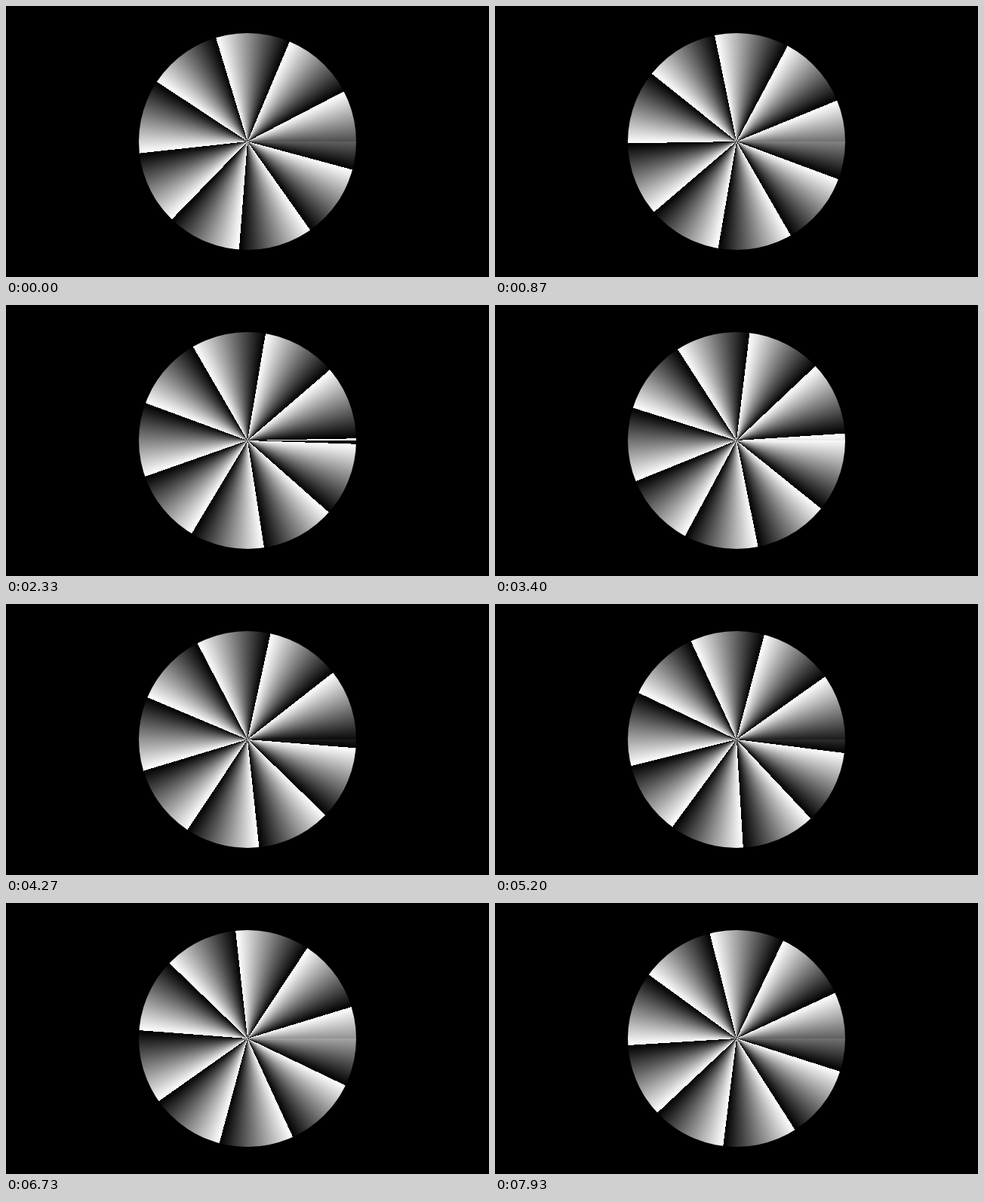
An HTML page that plays this animation: 640 by 360 pixels, repeating every 8000 ms.

```html
<!DOCTYPE html>
<html lang="en">
<head>
<meta charset="utf-8">
<title>Fan wheel</title>
<style>
  @property --start {
    syntax: "<angle>";
    inherits: false;
    initial-value: 15.1deg;
  }

  html, body {
    margin: 0;
    width: 100%;
    height: 100%;
    overflow: hidden;
    background: #000;
  }

  /* The blade width does not divide 360deg, which leaves a fixed seam at three o'clock. */
  .wheel {
    position: absolute;
    left: 176px;
    top: 36px;
    width: 288px;
    height: 288px;
    border-radius: 50%;
    background: repeating-conic-gradient(
      from 90deg,
      #fff var(--start),
      #000 calc(var(--start) + 39.67deg)
    );
    animation: turn 1s steps(15) -3.4ms infinite;
  }

  /* One blade per second, counterclockwise. */
  @keyframes turn {
    from { --start: 15.1deg; }
    to { --start: -24.57deg; }
  }
</style>
</head>
<body>
<div class="wheel"></div>
</body>
</html>
```
